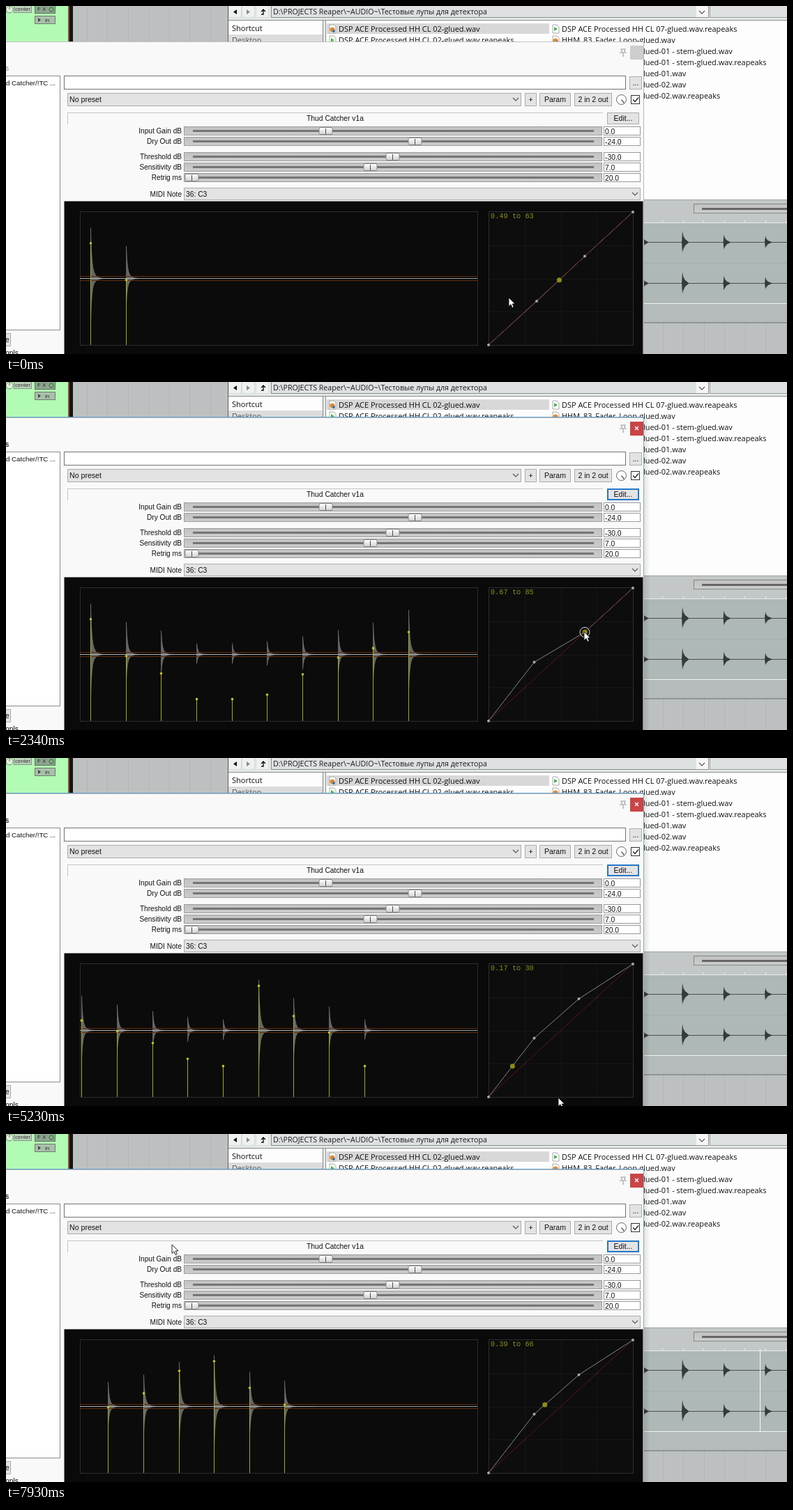
These frames come from a looping animation (1120x500 px, 8000 ms). An HTML page:

```html
<!DOCTYPE html>
<html lang="en">
<head>
<meta charset="utf-8">
<title>Thud Catcher</title>
<style>
  html, body { margin: 0; width: 100%; height: 100%; overflow: hidden; background: #bcbfbf; }
  svg { display: block; width: 1120px; height: 500px; }
  text { white-space: pre; }
  .ui { font-family: "Liberation Sans", Arial, sans-serif; }
  .files { font-family: "Open Sans", "Noto Sans", sans-serif; }
  .mono { font-family: "Liberation Mono", monospace; }
</style>
</head>
<body>
<svg id="stage" viewBox="0 0 1120 500"></svg>
<script>
const stage = document.getElementById('stage');
let layer = stage;

function el(tag, attrs, parent = layer) {
  const node = document.createElementNS('http://www.w3.org/2000/svg', tag);
  set(node, attrs);
  return parent.appendChild(node);
}
function set(node, attrs) {
  for (const name in attrs) node.setAttribute(name, attrs[name]);
}
const rect = (x, y, width, height, fill) =>
  el('rect', { x, y, width, height, fill, 'shape-rendering': 'crispEdges' });
function box(x, y, w, h, fill, border) {
  rect(x, y, w, h, border);
  return rect(x + 1, y + 1, w - 2, h - 2, fill);
}
const path = (d, stroke, width = 1, fill = 'none') =>
  el('path', { d, stroke, 'stroke-width': width, fill });
const circle = (cx, cy, r, fill, stroke = 'none') => el('circle', { cx, cy, r, fill, stroke });
function label(x, y, str, size = 10.3, cls = 'ui', fill = '#111', anchor = 'start') {
  const node = el('text', { x, y, 'font-size': size, class: cls, fill, 'text-anchor': anchor });
  node.textContent = str;
  return node;
}
const chevron = (x, y) => path(`M${x - 4} ${y - 2}l4 4l4 -4`, '#555', 1.1);
function gradient(id, top, bottom) {
  const g = el('linearGradient', { id, x2: 0, y2: 1 });
  el('stop', { offset: 0, 'stop-color': top }, g);
  el('stop', { offset: 1, 'stop-color': bottom }, g);
}

/* ---------- arrange view and track panel ---------- */
function drawArrange() {
  gradient('track', '#c2c2c2', '#cccccc');
  gradient('thumb', '#ffffff', '#d2d2d2');
  rect(0, 0, 1120, 500, '#bdc0c0');
  for (let x = 115.5; x < 1120; x += 29.5) rect(Math.round(x), 0, 1, 500, '#b2b6b6');
  rect(0, 0, 89, 51, '#b2fbb4');
  rect(89, 0, 3, 51, '#8a4a44');
  rect(91, 0, 5, 51, '#161414');
  circle(5, 5, 5, '#dff5df', '#6c8a6c');
  path('M5 5L5 0', '#c03030');
  box(11, -1, 26, 11, '#b9d2ba', '#7d987e');
  label(13, 7, 'center', 8, 'ui', '#333');
  box(41, -1, 30, 12, '#8ea68f', '#5d725e');
  label(45, 7, 'F X', 8, 'ui', '#20301f');
  circle(65, 5, 3, 'none', '#2f6a33');
  box(41, 14, 30, 12, '#a9bfa9', '#6a806b');
  path('M46 17l4 3l-4 3z', 'none', 0, '#3a4a3a');
  label(56, 23, 'in', 8, 'ui', '#20301f');
}

/* ---------- file browser ---------- */
function fileIcon(x, y, wave) {
  path(`M${x - 4} ${y - 6}h6l3 3v9h-9z`, '#a9a9a9', 1, '#fff');
  if (wave) path(`M${x - 2} ${y - 3}l5 3l-5 3z`, 'none', 0, '#4bb04b');
  else { circle(x, y + 1, 3.6, '#e08a30'); circle(x + 2, y + 3, 2, '#3f6fae'); }
}
function drawBrowser() {
  rect(318, 0, 802, 279, '#fdfdfd');
  rect(319, 0, 801, 21, '#e6e9e9');
  rect(319, 20, 801, 1, '#8b8b8b');
  rect(318, 0, 1, 51, '#5f5f5f');
  for (const x of [319, 338, 358]) box(x, -1, 19, 18, '#eff1f1', '#d6d9d9');
  path('M331 5v7l-5 -3.5z', 'none', 0, '#111');
  path('M345 5v7l5 -3.5z', 'none', 0, '#888');
  path('M366 12h3v-6M366 8l3 -3l3 3', '#111', 1.4);
  box(380, -1, 628, 18, '#dde1e1', '#8c8c8c');
  rect(990, 0, 17, 16, '#f6f6f6');
  chevron(998, 9);
  box(1009, -1, 112, 18, '#dde1e1', '#9d9d9d');
  label(383, 12, 'D:\\PROJECTS Reaper\\~AUDIO~\\Тестовые лупы для детектора', 10.65, 'files', '#1c1c1c');
  label(324, 35.5, 'Shortcut', 11, 'files');
  rect(319, 41, 135, 10, '#dcdcdc');
  label(324, 52.5, 'Desktop', 11, 'files', '#555');
  rect(454, 21, 5, 30, '#e6e9e9');
  rect(454, 21, 1, 30, '#8a8a8a');
  rect(458, 21, 1, 30, '#8a8a8a');
  rect(460, 25, 319, 15, '#d8d8d8');
  fileIcon(468, 33, false);
  fileIcon(468, 49, true);
  fileIcon(788, 33, true);
  fileIcon(788, 49, false);
  const rows = [
    [477, 0, 'DSP ACE Processed HH CL 02-glued.wav'],
    [477, 1, 'DSP ACE Processed HH CL 02-glued.wav.reapeaks'],
    [797, 0, 'DSP ACE Processed HH CL 07-glued.wav.reapeaks'],
    [797, 1, 'HHM_83_Fader_Loop-glued.wav'],
    [914, 2, 'lued-01 - stem-glued.wav'],
    [914, 3, 'lued-01 - stem-glued.wav.reapeaks'],
    [914, 4, 'lued-01.wav'],
    [914, 5, 'lued-02.wav'],
    [914, 6, 'lued-02.wav.reapeaks']
  ];
  for (const [x, row, name] of rows) label(x, 36.5 + row * 16.1, name, 10.95, 'files');
}

/* ---------- media preview on the right ---------- */
function drawPreview() {
  rect(913, 278, 207, 33, '#c3c7c7');
  rect(913, 278, 207, 1, '#9ba0a0');
  box(986, 284, 140, 14, 'url(#track)', '#858585');
  rect(998, 290, 122, 3, '#666');
  rect(913, 311, 207, 116, '#aeb8b6');
  rect(913, 311, 207, 1, '#e8ecec');
  for (let x = 941; x < 1120; x += 29.5) rect(Math.round(x), 308, 1, 3, '#e8ecec');
  rect(913, 369, 207, 1, '#a3adab');
  rect(913, 427, 207, 1, '#f2f5f5');
  rect(913, 428, 207, 26, '#b4bbba');
  rect(913, 454, 207, 2, '#8f9594');
  for (const y of [339.5, 398.5]) {
    path(`M913 ${y}H1120`, '#4a5050', 1);
    for (const [x, a] of [[911, 12], [969, 16], [1028.5, 11], [1088, 9]])
      path(`M${x} ${y}L${x + 1} ${y - a}L${x + 2.5} ${y - a * .55}L${x + 5} ${y - a * .28}L${x + 10} ${y - .5}` +
        `V${y + .5}L${x + 5} ${y + a * .28}L${x + 2.5} ${y + a * .6}L${x + 1} ${y + a * .9}Z`, 'none', 0, '#353b3b');
  }
  return rect(0, 309, 1, 119, '#f6fafa');
}

/* ---------- plug-in window ---------- */
function button(x, y, w, h, str) {
  box(x, y, w, h, '#e3e3e3', '#adadad');
  label(x + w / 2, y + h / 2 + 3.8, str, 10.5, 'ui', '#111', 'middle');
}
function slider(name, value, y, thumb) {
  label(252, y + 4, name, 10.1, 'ui', '#111', 'end');
  box(255, y - 6, 600, 13, 'url(#track)', '#9c9c9c');
  rect(268, y - 1, 575, 3, '#757575');
  el('rect', { x: thumb - 9, y: y - 4.5, width: 19, height: 10, rx: 2, fill: 'url(#thumb)', stroke: '#888' });
  rect(thumb, y - 3, 1, 8, '#4a4a4a');
  box(857, y - 6, 53, 13, '#fff', '#9a9a9a');
  label(859, y + 4.5, value);
}
function drawWindow() {
  rect(0, 51, 915, 449, '#f9f9f9');
  rect(0, 51, 915, 1, '#c4c4c4');
  rect(914, 51, 1, 449, '#b5b5b5');
  path('M881 62h8M883 62v5h4v-5M880 67h10M885 67v6', '#a2a2a2', 1.2);
  rect(895, 57, 19, 20, '#cdcdcd');
  label(-1, 93, 's', 10.3, 'ui', '#888');
  box(-2, 100, 80, 366, '#fff', '#8a8a92');
  label(0, 114, 'd Catcher/!TC ...', 9.7);
  button(-20, 470, 27, 19, '');
  label(-1, 483, 'e');
  label(-1, 502, 'npls', 10.3);
  box(83, 100, 806, 20, '#fff', '#737373');
  button(894, 101, 18, 19, '...');
  box(88, 125, 651, 19, '#e3e3e3', '#adadad');
  label(91, 138, 'No preset', 10.6);
  chevron(731, 134);
  button(744, 125, 17, 19, '+');
  button(765, 125, 45, 19, 'Param');
  button(815, 125, 54, 19, '2 in 2 out');
  circle(882.5, 134.5, 7, '#fff', '#666');
  path('M882.5 134.5l4 5', '#222', 1.2);
  box(896, 128, 13, 13, '#fff', '#333');
  path('M899 134.5l3 3l5 -6', '#222', 1.3);
  rect(88, 153, 768, 1, '#c6c6c6');
  rect(88, 153, 1, 17, '#c6c6c6');
  label(472, 165, 'Thud Catcher v1a', 10.3, 'ui', '#111', 'middle');
  button(862, 153, 46, 17, 'Edit...');
  slider('Input Gain dB', '0.0', 179, 458);
  slider('Dry Out dB', '-24.0', 194, 586);
  slider('Threshold dB', '-30.0', 216, 554);
  slider('Sensitivity dB', '7.0', 231, 522);
  slider('Retrig ms', '20.0', 246, 266);
  label(252, 274, 'MIDI Note', 10.1, 'ui', '#111', 'end');
  box(255, 261, 655, 18, '#e3e3e3', '#adadad');
  label(258, 274, '36: C3', 10.3);
  chevron(902, 270);
  el('rect', { x: 83.5, y: 280.5, width: 830, height: 220, fill: '#0a0a0a' });
  box(106, 295, 571, 193, '#0b0b0b', '#2d2d2d');
  box(692, 295, 208, 193, '#0d0d0d', '#2d2d2d');
  for (let i = 1; i < 4; i++) {
    rect(692 + Math.round(51.75 * i), 296, 1, 191, '#171717');
    rect(693, 296 + Math.round(47.75 * i), 206, 1, '#171717');
  }
}
function drawFocus() {
  const group = layer = el('g', {}, stage);
  rect(0, 50, 915, 1, '#5d9cc9');
  rect(914, 51, 1, 229, '#8fa9bd');
  for (let i = 0; i < 8; i++) rect(915 + i, 51 + i, 1, 449, `rgba(0,0,0,${.1 - i * .012})`);
  rect(895, 57, 19, 20, '#c94545');
  path('M902 64l5 5M907 64l-5 5', '#fff', 1.3);
  label(-1, 93, 's', 10.3, 'ui', '#111');
  el('rect', { x: 863, y: 154, width: 44, height: 15, fill: 'none', stroke: '#2478c8', 'stroke-width': 2 });
  layer = stage;
  return group;
}

drawArrange();
drawBrowser();
const playhead = drawPreview();
drawWindow();
const focus = drawFocus();

const wave = path('', '#858585', .5, '#666');
path('M106 388.5H676M106 394.5H676', '#5e2d0f');
path('M106 391.5H676', '#9c9c9c');
const tail = path('', '#b0b0b0', 1);
const stems = path('', '#a9a91c');
const hitDots = path('', '#c3c322', 3.6);
hitDots.setAttribute('stroke-linecap', 'round');
const curve = path('', '#858585');
path('M692 487L899 296', '#6e1a18', .8);
const handles = path('', '#a8a8a8', 4);
handles.setAttribute('stroke-linecap', 'round');
const marker = circle(0, 0, 3.5, '#8e8e12');
const ring = circle(0, 0, 7, 'none', '#e2e2e2');
const readout = label(695, 305, '', 10.3, 'mono', '#8c8c16');
const pointer = path('M0 0V12.5L3 9.8L5 14.5L7.2 13.5L5.2 9H9Z', '#111', .9, '#fff');

/* ---------- motion: [time, x, y] ---------- */
const MOUSE = [
  [0, 721, 419], [720, 755, 424], [900, 761, 423], [1080, 761, 423], [1260, 758, 410],
  [1440, 758, 407], [1620, 757, 402], [1800, 765, 396], [2160, 829, 359], [2880, 829, 358],
  [3790, 821, 346], [4510, 821, 346], [5230, 792, 488], [5410, 842, 489], [5950, 1104, 470],
  [6670, 542, 407], [7030, 260, 400], [7210, 159, 390], [7570, 255, 330], [7930, 238, 159]
];
const LOW = [[1080, 761, 424], [1260, 758, 410], [1440, 758, 408], [1620, 757.5, 402.5]];
const HIGH = [[2880, 830, 359.5], [3790, 821.5, 346]];
const LEVELS = [.765, .49, .36, .166, .166, .2, .274, .37, .48, .668, .772, .523, .39, .29, .205, .166];
const STEP = 180, LOOP = 8000;
const SCAN_START = 190, SPEED = .1755, SWEEP = 570, FIRST_HIT = 121.5, HIT_GAP = 50.66;
const PLAY_LOOP = HIT_GAP / SPEED * 16, PLAY_SPEED = .204;

function at(keys, t) {
  const i = keys.findIndex(k => k[0] > t);
  if (i === 0) return keys[0].slice(1);
  if (i < 0) return keys[keys.length - 1].slice(1);
  const [t0, x0, y0] = keys[i - 1], [t1, x1, y1] = keys[i];
  const f = (t - t0) / (t1 - t0);
  return [x0 + (x1 - x0) * f, y0 + (y1 - y0) * f];
}
const curvePoints = t => [[692, 487], at(LOW, t), at(HIGH, t), [899, 296]];

function hit(k) {
  const x = FIRST_HIT + HIT_GAP * k, level = LEVELS[k % 16];
  const pts = curvePoints((x - SCAN_START) / SPEED), cx = 692 + 207 * level;
  const i = pts.findIndex(p => p[0] >= cx);
  const [x0, y0] = pts[i - 1], [x1, y1] = pts[i];
  return { x, level, cx, y: y0 + (y1 - y0) * (cx - x0) / (x1 - x0) };
}

// A sharp attack over a softer, slower body.
const decay = dx => .62 * Math.exp(-dx / 1.3) + .38 * Math.exp(-dx / 4);

function burst(x, level, end) {
  const up = [], down = [], peak = 95.5 * level;
  for (let dx = 0; dx <= 18 && x + dx <= end; dx++) {
    const a = peak * decay(dx);
    up.push(`${x + dx} ${391.5 - a}`);
    down.unshift(`${x + dx} ${391.5 + a * .83}`);
  }
  return `M${up.concat(down).join('L')}Z`;
}

function render(now) {
  const base = now < 3790 ? 0 : 3790;
  const t = base + Math.floor((now - base) / STEP) * STEP;
  const pos = SCAN_START + SPEED * t;
  const shift = Math.floor((pos - 106) / SWEEP) * SWEEP;
  const last = Math.floor((pos - FIRST_HIT) / HIT_GAP);

  let waveD = '', stemD = '', dotD = '';
  for (let k = 0; k <= last; k++) {
    const h = hit(k), x = Math.floor(h.x - shift) + .5;
    if (x < 106) continue;
    waveD += burst(x, h.level, pos - shift);
    stemD += `M${x} ${h.y}V487`;
    dotD += `M${x} ${h.y}h.01`;
  }
  set(wave, { d: waveD });
  set(stems, { d: stemD });
  set(hitDots, { d: dotD });
  set(tail, { d: `M106 391.5H${pos - shift}` });

  const pts = curvePoints(t), recent = hit(last);
  set(curve, { d: 'M' + pts.map(p => p.join(' ')).join('L') });
  set(handles, { d: pts.map(p => `M${p.join(' ')}h.01`).join('') });
  set(marker, { cx: recent.cx, cy: recent.y });
  const note = Math.round(1 + 126 * (487 - recent.y) / 191);
  readout.textContent = `${(recent.level + 1e-6).toFixed(2)} to ${note}`;

  const [mx, my] = at(MOUSE, t);
  set(pointer, { transform: `translate(${mx} ${my})` });
  const near = pts.slice(1, 3).find(p => Math.hypot(p[0] - mx, p[1] - my) < 6);
  set(ring, { visibility: near ? 'visible' : 'hidden' });
  if (near) set(ring, { cx: near[0], cy: near[1] });

  const play = 915 + PLAY_SPEED * ((t - 2498 + PLAY_LOOP) % PLAY_LOOP);
  set(playhead, { x: Math.round(play), visibility: play < 1120 ? 'visible' : 'hidden' });
  set(focus, { visibility: t < 900 ? 'hidden' : 'visible' });
}

const start = performance.now();
function tick() {
  render((performance.now() - start) % LOOP);
  requestAnimationFrame(tick);
}
tick();
</script>
</body>
</html>
```
